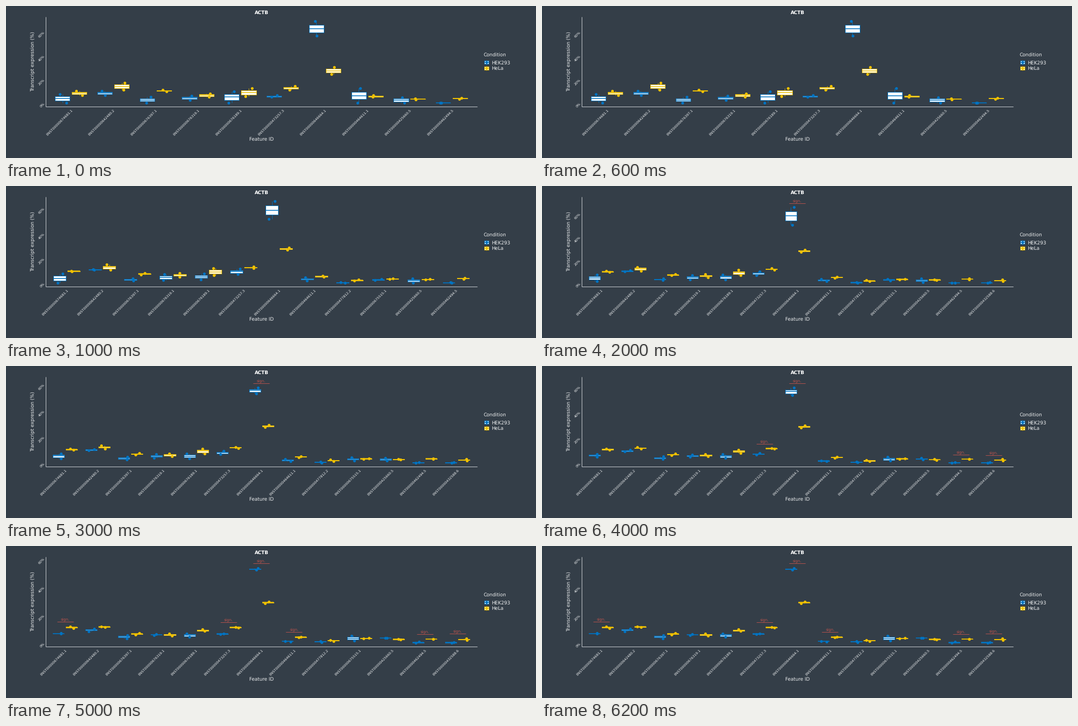
These frames come from a looping animation (974 px wide and 281 px high, 7000 ms). A matplotlib script:

```python
import numpy as np
import matplotlib.pyplot as plt
from matplotlib.animation import FuncAnimation
from matplotlib.patches import Rectangle

W, H, DPI = 974, 281, 64
PT = 72 / DPI  # points per pixel
BG, EDGE, INK, AXIS, RED = "#343e48", "#2c3b45", "#eceeef", "#d3d7da", "#bd534d"
BLUE, GOLD = "#0073c2", "#efc000"
LEFT, RIGHT, TOP, BASE = 72.6, 866, 20, 186.4
ZERO, PEAK = 181, 28  # heights of 0 % and of the topmost item
STEPS = 6
SIGN_GAP = 5  # percent between the higher dot and its label

plt.rcParams["font.family"] = "DejaVu Sans"
plt.rcParams["text.hinting"] = "none"

# Steps at which key values hold, by how many are given
KEY_STEPS = {1: (0,), 2: (0, 5), 3: (0, 1, 5), 6: range(STEPS)}

# id, first step shown, first significant step,
# then percent keys: blue middle, blue gap, gold middle, gold gap
FEATURES = [
    ("674681.1", 0, 5, (4.5, 4.5, 7.4), (7.3, 7.5, .2), (9, 10.2, 11.7), (3.4, .6, 1.3)),
    ("642480.2", 0, 9, (9, 11.4, 9.9), (3.4, .4, 2), (14.7, 13.3, 12.1), (6.1, 4.1, .6)),
    ("676397.1", 0, 9, (3.3, 3.6, 5), (4.8, 1.6, 2.3), (11.1, 8, 7.1), 1),
    ("676319.1", 0, 9, (5, 6.5), (3.6, 4.8, .4), (7.3, 6.5), (3, 1.6)),
    ("676189.1", 0, 9, (5.7, 6.1), (9.9, 4.8, 2.5), 9.7, (7, 1.3)),
    ("473257.3", 0, 4, (6.4, 9.8, 7.1), (1.4, 4.3, .6), (13.5, 11.7), (3.2, 1.3, .3)),
    ("646664.1", 0, 2, (63.3, 58.9, 58.5, 55.6, 56.3, 53),
     (12.5, 14.3, 15.6, 4.3, 6.1, 1.1), (27.9, 29.3), (6, 1.8, 1.4)),
    ("464611.1", 0, 5, (7, 3.9, 1.8), (12.3, 2.4, .2), (6.4, 4.8), (1.4, .4)),
    ("477812.2", 1, 9, (.9, 1.6), .6, (3, 2.4), .9),
    ("675515.1", 1, 9, (3.2, 4), (0, 3.6), 4, .6),
    ("425660.5", 0, 9, (3.2, 2.6, 4.3), (4.8, 3.8, .2), (4.1, 3.6, 3.3), .5),
    ("462494.5", 0, 4, 1, (0, .8), (4.7, 3.5), (.9, .1)),
    ("432588.6", 2, 4, 1, .5, (2.7, 3.2), 1.2),
]

fig = plt.figure(figsize=(W / DPI, H / DPI), dpi=DPI, facecolor=BG)
ax = fig.add_axes([0, 0, 1, 1])


def track(keys, step):
    keys = np.atleast_1d(keys)
    return np.interp(step, KEY_STEPS[len(keys)], keys)


def span(mid, gap, step):
    m, g = track(mid, step), track(gap, step)
    return m - g / 2, m + g / 2


def text(x, y, s, px, ha="center", color=INK, angle=0, weight="normal"):
    ax.text(x, y, s, fontsize=px * PT, ha=ha, va="baseline", color=color,
            rotation=angle, rotation_mode="anchor", weight=weight)


def line(xs, ys, color, px, z=2):
    ax.plot(xs, ys, color=color, lw=px * PT, solid_capstyle="butt", zorder=z)


def dots(xs, ys, color):
    ax.plot(xs, ys, "o", ms=5.2 * PT, color=color, mew=0, zorder=4)


def box(x, w, low, high, q1, q3, color):
    line([x, x], [low, q1], color, 0.8)
    line([x, x], [q3, high], color, 0.8)
    ax.add_patch(Rectangle((x - w / 2, q1), w, q3 - q1, fc="white", ec=color,
                           lw=0.9 * PT, joinstyle="miter", zorder=2))
    mid = (q1 + q3) / 2
    line([x - w / 2, x + w / 2], [mid, mid], color, 1.5, 3)


def legend():
    text(877.7, 93.2, "Condition", 8.7, "left")
    for y, name, color in [(104.2, "HEK293", BLUE), (115, "HeLa", GOLD)]:
        box(882.7, 8.2, y - 4.3, y + 4.3, y - 3, y + 3, color)
        dots([882.7], [y], color)
        text(892.6, y + 3.2, name, 8.7, "left")


def axes_frame(scale):
    line([LEFT, LEFT], [TOP, BASE], AXIS, 0.9)
    line([LEFT, RIGHT], [BASE, BASE], AXIS, 0.9)
    for pct in range(0, 80, 20):
        text(71.8, ZERO - pct * scale + 0.3, f"{pct}%", 6.2, "right", angle=45)
    text(469.5, 14.6, "ACTB", 8.8, color="white", weight="bold")
    text(469.5, 249, "Feature ID", 8.7)
    text(51.9, 103, "Transcript expression (%)", 8.7, angle=90)


def draw(i):
    step = min(i, STEPS - 1)
    ax.clear()
    ax.set(xlim=(0, W), ylim=(H, 0))
    ax.axis("off")
    ax.add_patch(Rectangle((0.5, 0.5), W - 1, H - 1, fill=False, ec=EDGE, lw=PT))

    rows = []
    for name, first, sign, blue, blue_gap, gold, gold_gap in FEATURES:
        if step >= first:
            spans = span(blue, blue_gap, step), span(gold, gold_gap, step)
            rows.append((name, spans, step >= sign, np.max(spans)))

    # The axis stretches so that the highest dot or label just fits
    scale = (ZERO - PEAK) / max(top + SIGN_GAP * sig for *_, sig, top in rows)
    axes_frame(scale)
    legend()

    unit = (RIGHT - LEFT) / (len(rows) + 0.2)
    rng = np.random.default_rng(len(rows))
    for k, (name, spans, sig, top) in enumerate(rows):
        x = LEFT + unit * (k + 0.6)
        text(x + 3.5, 192.8, "ENST00000" + name, 6.25, "right", angle=45)
        for side, color, ends in zip((-1, 1), (BLUE, GOLD), spans):
            low, high = ZERO - np.array(ends) * scale
            c, q = x + side * 0.2 * unit, (high - low) / 4
            box(c, 0.35 * unit, low, high, low + q, high - q, color)
            dots(c + rng.uniform(-0.1, 0.1, 2) * unit, [low, high], color)
        if sig:
            y = ZERO - (top + SIGN_GAP) * scale
            text(x, y + 2, "sign.", 6.9, color=RED)
            line([x - unit / 4, x + unit / 4], [y + 4.2, y + 4.2], RED, 0.9)
    return []


anim = FuncAnimation(fig, draw, frames=STEPS + 1, interval=1000,
                     init_func=lambda: draw(0), repeat=True, repeat_delay=0)
plt.show()
```
